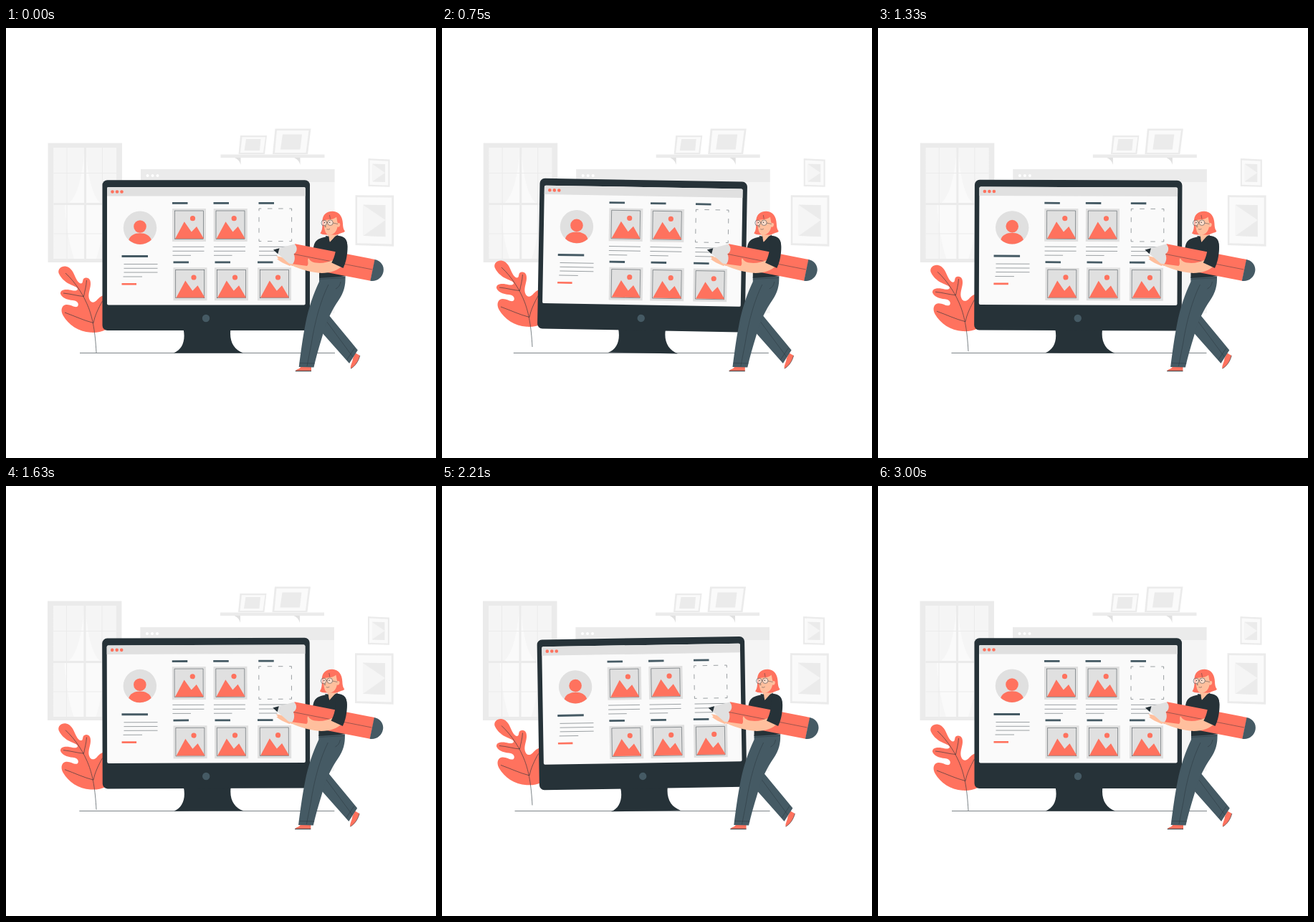
Animation of 600x600 px, one loop 3.04 s. Source, as an HTML page:

```html
<!DOCTYPE html>
<html lang="en">
<head>
<meta charset="utf-8">
<title>Portfolio update</title>
<style>
html, body { margin: 0; width: 100%; height: 100%; overflow: hidden; background: #fff; }
svg { display: block; width: 100vw; height: 100vh; }
.coral { fill: #ff725e; }
.dark { fill: #263238; }
.slate { fill: #455a64; }
.skin { fill: #ffbf9d; }
.g1 { fill: #ebebeb; }
.g2 { fill: #e0e0e0; }
.g3 { fill: #f5f5f5; }
.g4 { fill: #fafafa; }
.line { fill: none; stroke: #263238; stroke-width: .6; }
.thin { fill: none; stroke: #263238; stroke-width: .45; }
</style>
</head>
<body>
<svg viewBox="0 0 600 600">
  <g id="room">
    <!-- window -->
    <path class="g1" d="M58.5 160.5H162V327H58.5Z"/>
    <path class="g4" d="M66.5 167H154V322H66.5Z"/>
    <path class="g3" d="M66.5 167H109.5C108 198 101 234 88 244H66.5Z M154 167H111.5C113 198 119 234 132 244H154Z M66.5 247H82C84 275 88 301 95 322H66.5Z M154 247H139C137 275 133 301 126 322H154Z"/>
    <path fill="none" stroke="#ebebeb" d="M85 167V322M134.500 167V322M66.500 202.500H154M66.500 287H154"/>
    <path class="g1" d="M109 167H112V322H109Z M66.5 244H154V247H66.5Z"/>
    <!-- shelf -->
    <path class="g1" d="M299.500 176.500H444.500V181H299.500Z"/>
    <path class="g2" d="M319 181H327.500V191C326 185 323 183 319 181Z M402 181H410.500V191C409 185 406 183 402 181Z"/>
    <path class="g1" d="M327 150H364L361 176H324.500Z M375.500 140.500H425.500L421 176H372Z"/>
    <path class="g4" d="M329.500 152.300H362L359 174H327Z M378 143H422.500L418.500 174H375Z"/>
    <path class="g1" d="M335 155H355.500L354 171H332.500Z M386 148.500H413L410.500 169.500H383Z"/>
    <!-- wall frames -->
    <path class="g1" d="M505.500 182L535.500 183.500V221.800L505.500 221Z M487.500 233.300L541.200 233.500V304.700L487.500 303Z"/>
    <path class="g4" d="M507.500 184.500L533.300 185.700V219.500L507.500 218.800Z M490 236L538.300 236.500V301.500L490 300.300Z"/>
    <path class="g1" d="M511.500 189.500L529 190V215L511.500 214.500Z M498.500 246.500L529.500 247V291.300L498.500 290Z"/>
    <path class="g3" d="M511.500 190L529 202L511.500 214Z M498.500 247L529.500 268L498.500 290Z"/>
    <!-- rear browser -->
    <path class="g3" d="M188 197H458.500V398H188Z"/>
    <path class="g1" d="M188 197H458.500V215H188Z"/>
    <g fill="#fff"><circle cx="197.500" cy="206" r="2"/><circle cx="204.500" cy="206" r="2"/><circle cx="211.500" cy="206" r="2"/></g>
  </g>

  <g id="floor"><path class="line" d="M103 453.500H459"/></g>

  <g id="plant">
    <path class="coral" d="M73.500 342C72 336 78 331.500 84 332.800C91 334.500 94 341 96.500 347C99 353 103 358 106 356C108 354 106 349.500 111 348.500C116 347.800 118.500 352 118 358C117.500 365 113.500 372 116.500 379C119 384.500 124 383 127 379.500C130 376 134 372.500 139 373V421C133 424 126 425.300 118 424.800C101 424 87 414 79.500 401C75.500 393.500 78 386.500 84 386C90 385.500 95 390 99 389C102 387.500 101.500 382 96 380.500C89 379.500 79 378.500 76 371C75.500 365 83 364.500 89 365.500C94 366.500 99 367.500 100 364.500C100 361 93 360 86 356C80 352 75.500 347 73.500 342Z"/>
    <path class="line" d="M83 342C98 356 109 374 115.500 391C121 406 124.500 424 126 453M112.500 352C112 361 109.500 368 108.500 374.500M80 370C91 371 100 374 108.500 374.500M82 397C96 402 108 408 122 411.500M134.500 381C129 391 124 401 122 411.500"/>
  </g>

  <g id="monitor">
    <path class="dark" d="M247.500 420C251 436 246 449 234 453.500H331C318 449 311 437 313.500 420Z"/>
    <rect class="dark" x="134.500" y="212.200" width="289.500" height="209.800" rx="7"/>
    <rect class="g4" x="141" y="222" width="276.700" height="164.500" rx="2"/>
    <path class="g2" d="M141 234.500V224Q141 222 143 222H415.700Q417.700 222 417.700 224V234.500Z"/>
    <g class="coral"><circle cx="148.500" cy="228.500" r="2.300"/><circle cx="155" cy="228.500" r="2.300"/><circle cx="161.500" cy="228.500" r="2.300"/></g>
    <circle class="slate" cx="279" cy="405" r="5.200"/>
    <circle class="g2" cx="187" cy="278.800" r="23.200"/>
    <circle class="coral" cx="187" cy="277" r="8.800"/>
    <path class="coral" d="M171.300 295.800C174 283 200 283 202.700 295.800A23.200 23.200 0 0 1 171.300 295.800Z"/>
    <path class="slate" d="M161.500 317H198V320H161.500Z"/>
    <path class="coral" d="M161.500 356H182V358.600H161.500Z"/>
    <path class="thin" d="M164.500 329.500H211.500M164.500 335.300H211.500M164.500 341H211.500M163.500 347H190"/>
    <g id="cards"></g>
    <rect class="thin" x="353" y="252" width="45.600" height="45.600" stroke-dasharray="6.500 8.700" stroke-dashoffset="3.250"/>
  </g>

  <g id="person">
    <!-- far leg and shoe -->
    <path class="coral" d="M487.500 453.500L493.800 457C492 465 487 472 481 475.300C480 471 483.500 467 484 461Z"/>
    <path class="line" d="M493.800 457C492 465 487 472 481 475.300"/>
    <path class="slate" d="M450 400C464 417 478 433.500 490.800 449.500L479 468L440 424Z"/>
    <path class="dark" d="M451 402L441 425L438.500 419Z"/>
    <path class="thin" d="M447 409L484 459M486.500 446.500L475.500 463"/>
    <!-- near leg and shoe -->
    <path class="coral" d="M411.500 472.500L426 473V478.700H403.800C404.500 476 410 476.500 411.500 472.500Z"/>
    <path class="line" d="M403.800 478.700H426" style="stroke-width:1"/>
    <path class="slate" d="M437 347H473.500C474 359 471.500 369 464 380C455 393 447 409 442 428C437 445 433 458 429.500 473.500L408.700 473C411 455 414 432 418 412C422 391 429 371 437 354Z"/>
    <path class="thin" d="M450 358C439 380 431 409 426 441L420 472M409.700 467.500L431 468M467 354C466 359 464 362 460 364"/>
    <!-- torso -->
    <path class="dark" d="M446 291.500C437 293 432 296 430 302L427.500 312L437 318V349L474 346.500C472 330 478 307 475.500 298C474 292 468 290 461 289.500Z"/>
    <path class="skin" d="M450.500 284L461 283V289.500L452 299L449 291Z"/>
    <path class="dark" d="M446 290L450.500 290.800L451.500 299.500L447.500 296Z M463.500 288.800L459 291L451.500 299.500L460 298Z"/>
    <!-- far hand -->
    <path class="skin" d="M377 318.500C382 318 387 321 392 323L402 329L396 332C389 329 382 326 377.500 322C381 323 380 320.500 377 318.500Z"/>
    <!-- pencil -->
    <path class="coral" d="M403.500 301.300L515 323L508.500 352.800L398 331.200L388 316Z"/>
    <path class="slate" d="M514.500 322.900C523 324.500 528.300 332 526.600 340C525 348.500 517 354.400 508.300 352.800Z"/>
    <path class="g2" d="M373 309.500L402.500 301.500C406.500 304.500 407.500 312 401.500 315.500C404 319.500 403 328 398 331.200Z"/>
    <path class="dark" d="M373 309.500L381.500 307.200L379.300 315.200Z"/>
    <path class="thin" d="M402 315.500L511 337"/>
    <!-- near arm -->
    <path class="skin" d="M470 331C463 339 450 342.500 437 341.800C422 340.500 405 335 394 328.500L420 332C423.500 329 419.500 324 422.200 321.300C424.500 325 427 327 432 327.600C441 328.800 449 327 456 324Z"/>
    <path class="dark" d="M463 291C473 289.500 477.500 298 476.500 309C476 320 473.500 329 470.500 335L454.300 327.500C459 319 461 309 460.500 300Z"/>
    <path class="thin" d="M437 350.500L473.500 348.500"/>
    <!-- head -->
    <path class="coral" d="M441.500 271C441 261 447 255.600 456 255.800C465 256.200 469.500 263 470 273C470.200 279 471.500 282 473 283.500C470.500 286.500 466 285.500 463 288.500H447C443 288.600 440.500 287.800 438.500 286.500C441.500 282 441.500 278 441.500 271Z"/>
    <path class="skin" d="M443.500 268C449 267.500 457 266.500 461 263.500C462 267 462 270 463 272.500C465 271 467 273 466 275.500C465.500 277.500 464 278 462.500 277.500C461.500 284 456.500 289.200 451 289C445 288.300 443.300 279 443.500 268Z"/>
    <path class="coral" d="M441.500 269C446 268.500 450 266 451.500 262L453 267C458 266.500 462 264 463 260L455 256.500L445 260Z"/>
    <path class="thin" d="M451.500 261L452.500 266.500M447.500 280.500Q449.500 282 452 280.300M446 275L445 277.500H447M456 272L463 273.500M447.500 271.500H449"/>
    <g fill="#fff" fill-opacity=".45" stroke="#263238" stroke-width=".5"><circle cx="443.800" cy="272" r="3.800"/><circle cx="452.500" cy="271.700" r="3.800"/></g>
    <g class="dark"><circle cx="444.500" cy="271.500" r=".7"/><circle cx="451.700" cy="271.300" r=".7"/></g>
  </g>
</svg>
<script>
const el = id => document.getElementById(id);

// Parts of the picture cards
const heading = (x, y) => `<path class="slate" d="M${x} ${y}h21.500v2.800h-21.500Z"/>`;
const picture = (x, y) => `<g transform="translate(${x} ${y})">
  <rect class="g2" width="47" height="46"/>
  <rect class="thin" x="3.300" y="3" width="40" height="39.500"/>
  <path class="coral" d="M4 42L16.800 18.300L26.800 32.500L34 25L44 42Z"/>
  <circle class="coral" cx="28.500" cy="13.700" r="3.600"/></g>`;
const caption = (x, w) =>
  `<path class="thin" d="M${x} 305.300h${w}M${x} 311.300h${w}M${x} 317.300h${w * .58}"/>`;

el("cards").innerHTML =
  [232, 289.5, 352.5].map(x => heading(x, 243) + caption(x + .5, 44)).join("") +
  [233.5, 291.5, 351].map(x => heading(x, 325.5)).join("") +
  [232, 289.7].map(x => picture(x, 252)).join("") +
  [233.5, 291, 351].map(x => picture(x, 334.3)).join("");

const LOOP = 3040, FPS = 24, UNIT = .8;
const SHAKE = [0, -1, 2, -4, 4, -4, 4, -4, 2, -1, 0];
const SWAY = [0, 1, 0, -1, 0];
const FLOAT = [0, -10, 0];

// Linear interpolation through evenly spaced keys
function along(keys, phase) {
  const p = (phase % 1) * (keys.length - 1), i = Math.floor(p);
  return keys[i] + (keys[i + 1] - keys[i]) * (p - i);
}
const move = (id, x, y) => el(id).setAttribute("transform", `translate(${x} ${y})`);

function pose(ms) {
  const step = Math.floor((ms % LOOP + 4.9) * FPS / 1000) % 73;
  const slow = step / FPS / 3, fast = slow * 2;
  const walk = along(SHAKE, fast) * UNIT;
  move("room", along(SHAKE, slow) * UNIT, 0);
  move("floor", walk, 0);
  move("person", walk, 0);
  move("plant", 0, along(FLOAT, fast) * UNIT);
  el("monitor").setAttribute("transform", `rotate(${along(SWAY, slow)} 279.250 333)`);
}

const start = performance.now();
function tick() {
  pose(performance.now() - start);
  requestAnimationFrame(tick);
}
tick();
</script>
</body>
</html>
```
